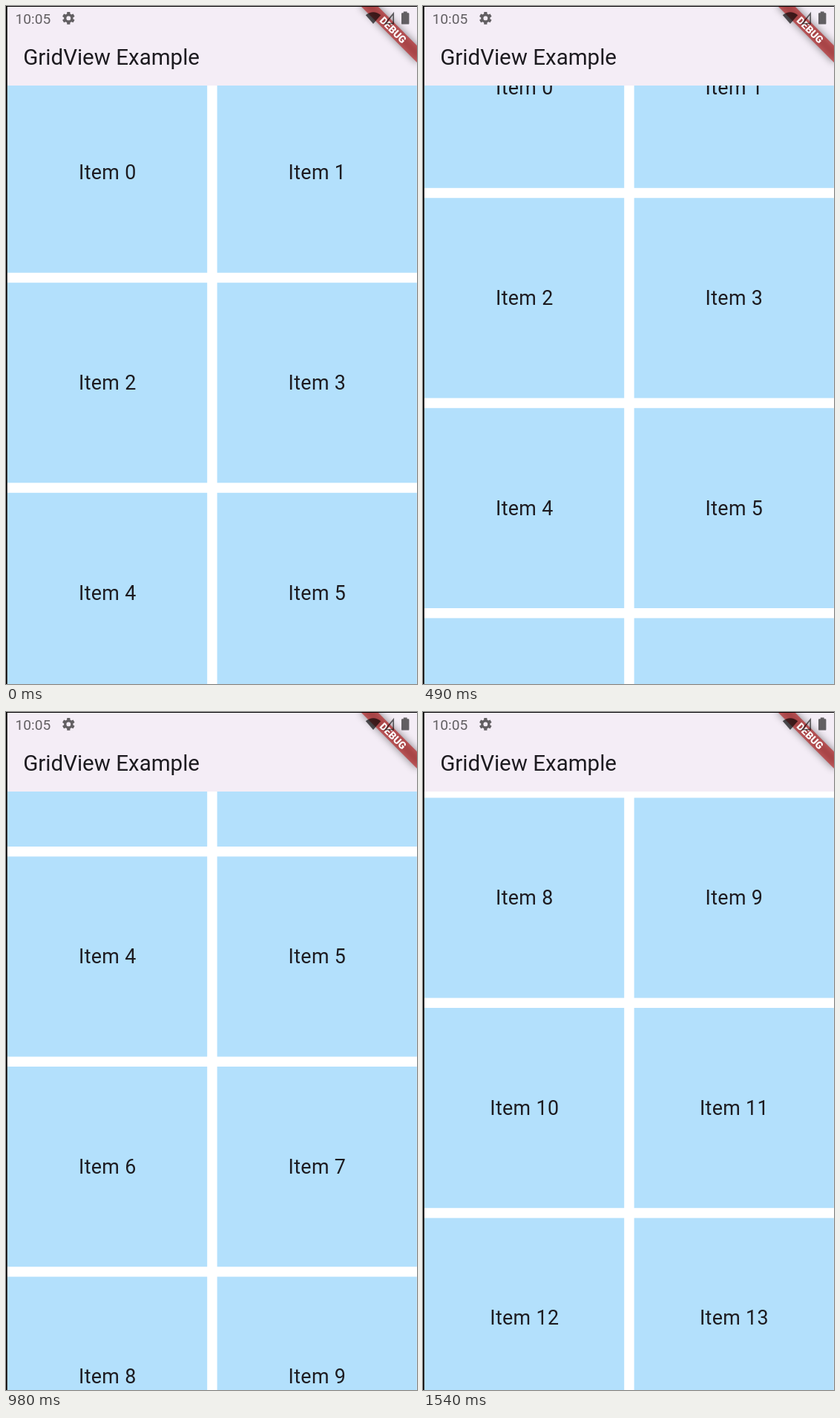
An HTML page with a canvas for the animation above (1610 ms loop, 554x912 px).

```html
<!DOCTYPE html>
<html lang="en">
<head>
<meta charset="utf-8">
<title>GridView Example</title>
<style>
  html, body { margin: 0; width: 100%; height: 100%; overflow: hidden; background: #fff; }
  canvas { display: block; width: 554px; height: 912px; }
</style>
</head>
<body>
<canvas id="stage" width="554" height="912"></canvas>
<script>
const ctx = document.getElementById('stage').getContext('2d');
const W = 554, H = 912, LOOP = 1610, STEP = 70;
const DP = 1.342;                 // pixels per logical unit
const BAR_BOTTOM = 107;
const TILE = 269.2, PITCH = 282.6, LEFT = 2, TOP = 89.6;
const ICON = 'rgba(0,0,0,0.6)';

// Scroll curve: time, offset, velocity
const scrollKeys = [
  [0, 0, 0.17], [280, 58, 0.235], [490, 114, 0.335], [770, 242, 0.7],
  [980, 460.4, 1.22], [1190, 766, 1.2], [1540, 1104.6, 0.66]
];

function scrollAt(t) {
  let i = 0;
  while (i < scrollKeys.length - 2 && t > scrollKeys[i + 1][0]) i++;
  const [t0, y0, v0] = scrollKeys[i], [t1, y1, v1] = scrollKeys[i + 1];
  const d = t1 - t0, u = (t - t0) / d, w = 1 - u;
  return w * w * (1 + 2 * u) * y0 + u * u * (3 - 2 * u) * y1
       + d * u * w * (w * v0 - u * v1);
}

function text(str, x, y, font, color, align = 'left', spacing = 0) {
  ctx.font = font + ' Roboto, sans-serif';
  ctx.letterSpacing = spacing + 'px';
  ctx.textAlign = align;
  ctx.fillStyle = color;
  ctx.fillText(str, x, y);
}

function rect(x, y, w, h, color) {
  ctx.fillStyle = color;
  ctx.fillRect(x, y, w, h);
}

function polygon(points) {
  ctx.beginPath();
  points.forEach(([x, y]) => ctx.lineTo(x, y));
  ctx.closePath();
}

function drawGrid(scroll) {
  const first = Math.max(0, Math.floor((scroll + BAR_BOTTOM - TOP) / PITCH));
  for (let row = first; TOP + row * PITCH - scroll < H; row++) {
    const y = TOP + row * PITCH - scroll;
    for (let col = 0; col < 2; col++) {
      const x = LEFT + col * PITCH;
      rect(x, y, TILE, TILE, '#b3e0fc');
      text('Item ' + (row * 2 + col), x + TILE / 2 + 0.2, y + TILE / 2 + 9.2,
        '26.84px', '#1d1b20', 'center', 0.34);
    }
  }
}

function drawRibbon() {
  const half = 40 * DP, y = 28 * DP, h = 12 * DP;
  ctx.save();
  ctx.translate(W, 0);
  ctx.rotate(Math.PI / 4);
  // Only the shadow lands on the stage; its caster lies outside.
  ctx.save();
  ctx.shadowColor = 'rgba(0,0,0,0.47)';
  ctx.shadowBlur = 10.6;
  ctx.shadowOffsetX = -2000;
  ctx.translate(2000 * Math.SQRT1_2, -2000 * Math.SQRT1_2);
  rect(-half, y, 2 * half, h, '#000');
  ctx.restore();
  rect(-half, y, 2 * half, h, 'rgba(183,28,28,0.627)');
  text('DEBUG', 0, y + h / 2 + 4.9, '900 13.7px', '#fff', 'center');
  ctx.restore();
}

function drawGear(cx, cy) {
  const points = [];
  for (let i = 0; i < 6; i++) {
    const a = i * Math.PI / 3 - Math.PI / 2;
    for (const [da, r] of [[-0.36, 6.2], [-0.24, 8.6], [0.24, 8.6], [0.36, 6.2]])
      points.push([cx + r * Math.cos(a + da), cy + r * Math.sin(a + da)]);
  }
  polygon(points);
  ctx.moveTo(cx + 2.9, cy);
  ctx.arc(cx, cy, 2.9, 0, 2 * Math.PI);
  ctx.fillStyle = ICON;
  ctx.fill('evenodd');
}

function drawStatusIcons() {
  drawGear(84.3, 16.4);

  ctx.fillStyle = 'rgba(0,0,0,0.65)';
  ctx.beginPath();
  ctx.moveTo(495, 24);
  ctx.lineTo(484.8, 12.2);
  ctx.quadraticCurveTo(495, 4.4, 505.2, 12.2);
  ctx.closePath();
  ctx.fill();

  polygon([[522.2, 10.2], [522.2, 23.6], [511.2, 23.6]]);
  ctx.strokeStyle = ICON;
  ctx.lineWidth = 1.7;
  ctx.stroke();

  ctx.fillStyle = ICON;
  ctx.beginPath();
  ctx.roundRect(533, 9.2, 10.4, 15.4, 1.2);
  ctx.rect(535.8, 7.4, 4.8, 1.8);
  ctx.fill();
}

function draw(t) {
  rect(0, 0, W, H, '#fff');
  drawGrid(scrollAt(t));
  rect(0, 0, W, BAR_BOTTOM, '#f4edf6');
  text('GridView Example', 23.2, 79.4, '29.52px', '#1d1b20');
  text('10:05', 12.6, 23.6, '19.1px', ICON);
  drawRibbon();
  drawStatusIcons();
  rect(0, 0, 1.7, H, '#000');
  rect(0, 0, W, 1, '#000');
}

const start = performance.now();
function tick() {
  const t = (performance.now() - start) % LOOP;
  draw(Math.floor(t / STEP) * STEP);
  requestAnimationFrame(tick);
}
tick();
</script>
</body>
</html>
```
